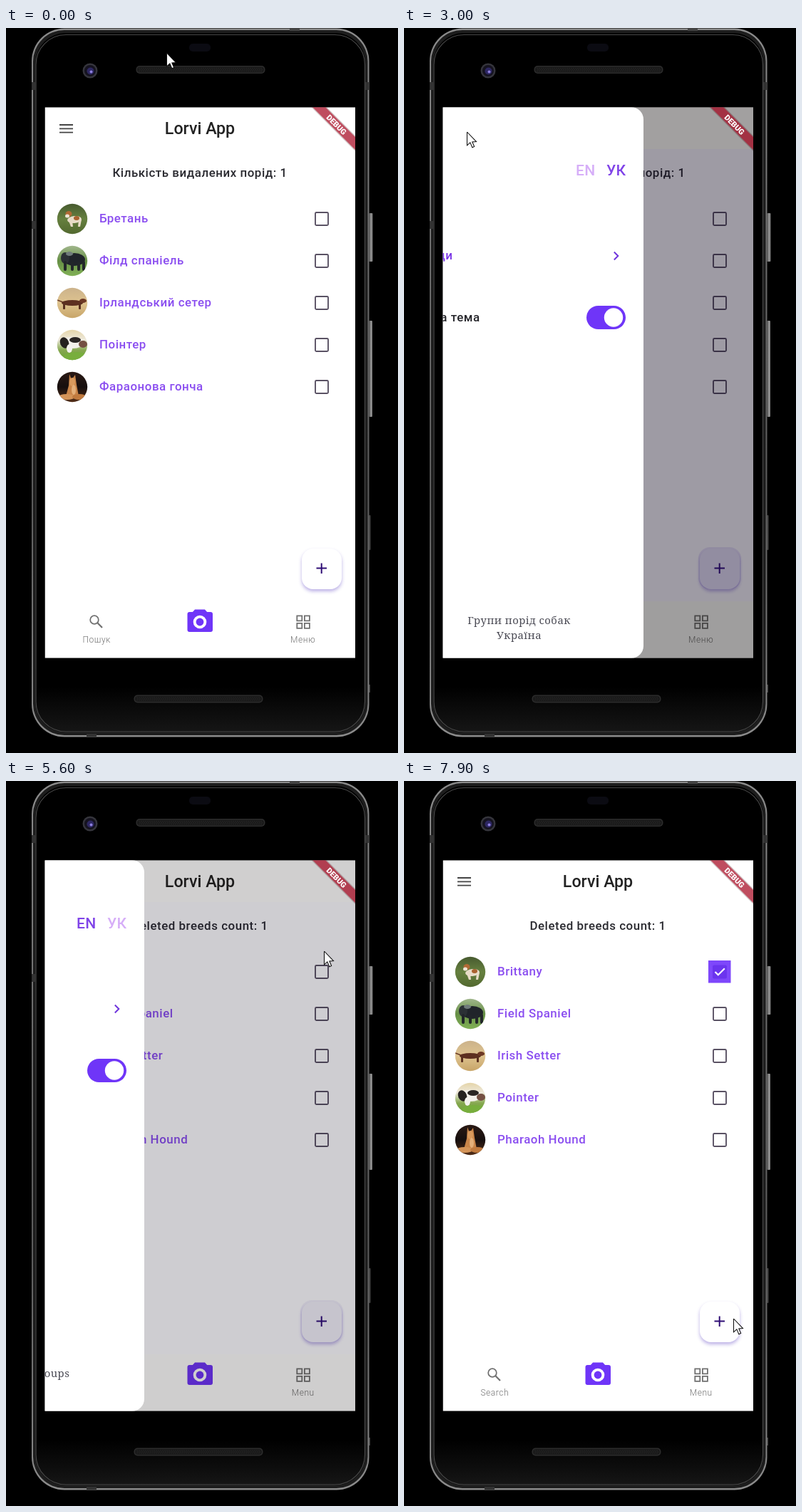
An HTML page with a canvas for the animation above (8000 ms loop, 550x1018 px).

```html
<!DOCTYPE html>
<html lang="uk">
<head>
<meta charset="utf-8">
<title>Dog breeds app</title>
<style>
html, body { margin: 0; width: 100%; height: 100%; overflow: hidden; background: #000; }
canvas { display: block; width: 550px; height: 1018px; }
</style>
</head>
<body>
<canvas id="stage" width="550" height="1018"></canvas>
<script>
const ctx = document.getElementById('stage').getContext('2d');
const LOOP = 8000, STEP = 100;
const SANS = 'Roboto, sans-serif', SERIF = '"Noto Serif", serif';
const PURPLE = '#6f35f8', LABEL = '#8a4df0';
const SCREEN = { x: 54.5, y: 111.3, w: 435.5, h: 773.5 };
const DRAWER_W = 348.5;

const TEXT = {
  uk: {
    count: 'Кількість видалених порід: 1',
    breeds: ['Бретань', 'Філд спаніель', 'Ірландський сетер', 'Поінтер', 'Фараонова гонча'],
    search: 'Пошук', menu: 'Меню', link: 'Породи', theme: 'Світла тема',
    footer: ['Групи порід собак', 'Україна']
  },
  en: {
    count: 'Deleted breeds count: 1',
    breeds: ['Brittany', 'Field Spaniel', 'Irish Setter', 'Pointer', 'Pharaoh Hound'],
    search: 'Search', menu: 'Menu', link: 'Breeds', theme: 'Light theme',
    footer: ['Dogs breed groups', 'Ukraine']
  }
};

// Keyframes: [time, x, y]
const POINTER = [
  [1300, 225, 35], [1800, 145, 146], [2200, 91, 151], [2400, 88, 146],
  [3250, 88, 146], [3500, 126, 151], [4200, 319, 196], [4450, 319, 196],
  [5050, 497, 227], [5200, 497, 227], [5500, 448, 238], [6100, 441, 243],
  [6400, 441, 262], [6900, 441, 262], [7850, 462, 755]
];
const OPEN_AT = 2864, CLOSE_AT = 5510, ENGLISH_AT = 4400, CHECK_AT = 6600;

// Smooth curve through the keyframes that keeps its speed at each one
function at(keys, t) {
  const last = keys.length - 1;
  const i = keys.findIndex(k => k[0] > t);
  if (i === 0) return keys[0].slice(1);
  if (i < 0) return keys[last].slice(1);
  const slope = (j, n) => (keys[j + 1][n] - keys[j][n]) / (keys[j + 1][0] - keys[j][0]);
  const tangent = (j, n) => {
    if (j === 0 || j === last) return 0;
    const p = slope(j - 1, n), q = slope(j, n);
    return p * q > 0 ? 2 * p * q / (p + q) : 0;
  };
  const a = keys[i - 1], b = keys[i], span = b[0] - a[0], u = (t - a[0]) / span;
  return [1, 2].map(n =>
    a[n] + (b[n] - a[n]) * u * u * (3 - 2 * u) +
    span * u * (1 - u) * ((1 - u) * tangent(i - 1, n) - u * tangent(i, n)));
}

// Critically damped spring from 0 to 1
function spring(ms) {
  const x = Math.max(0, ms) * .0224;
  return 1 - (1 + x) * Math.exp(-x);
}

function box(x, y, w, h, fill, r = 0) {
  ctx.fillStyle = fill;
  ctx.beginPath();
  ctx.roundRect(x, y, w, h, r);
  ctx.fill();
}

function frame(x, y, w, h, color, width, r = 0) {
  ctx.strokeStyle = color;
  ctx.lineWidth = width;
  ctx.beginPath();
  ctx.roundRect(x, y, w, h, r);
  ctx.stroke();
}

function oval(x, y, rx, ry, fill, turn = 0) {
  ctx.fillStyle = fill;
  ctx.beginPath();
  ctx.ellipse(x, y, rx, ry, turn, 0, Math.PI * 2);
  ctx.fill();
}

function line(color, width, ...pts) {
  ctx.strokeStyle = color;
  ctx.lineWidth = width;
  ctx.beginPath();
  pts.forEach(([x, y]) => ctx.lineTo(x, y));
  ctx.stroke();
}

function poly(fill, ...pts) {
  ctx.fillStyle = fill;
  ctx.beginPath();
  pts.forEach(([x, y]) => ctx.lineTo(x, y));
  ctx.closePath();
  ctx.fill();
}

function text(str, x, y, size, color, { weight = 500, gap = .53, align = 'left', family = SANS } = {}) {
  ctx.font = `${weight} ${size}px ${family}`;
  ctx.letterSpacing = gap + 'px';
  ctx.textAlign = align;
  ctx.fillStyle = color;
  ctx.fillText(str, x, y);
}

function fade(x0, y0, x1, y1, ...colors) {
  const g = ctx.createLinearGradient(x0, y0, x1, y1);
  colors.forEach((c, i) => g.addColorStop(i / (colors.length - 1), c));
  return g;
}

function speaker(x, y) {
  box(x, y, 181, 11, '#2c2c2c', 5);
  box(x + 1.5, y + 1.5, 178, 8, '#191919', 4);
  ctx.setLineDash([1, 2]);
  for (let i = 0; i < 3; i++) line('#333', 1, [x + 4 + i % 2, y + 3.5 + i * 2], [x + 177, y + 3.5 + i * 2]);
  ctx.setLineDash([]);
}

function phone() {
  const metal = fade(509, 0, 515, 0, '#333', '#9a9a9a', '#666');
  box(0, 0, 550, 1018, '#000');
  box(509, 260, 5.5, 68, metal, 1);
  box(509, 411, 5, 135, metal, 1);
  box(509, 684, 2.5, 49, '#444', 1);
  box(509, 922, 2, 11, '#444');
  box(36, .5, 473.5, 995, fade(0, 0, 0, 996, '#8c8c8c', '#6c6c6c', '#5c5c5c', '#8c8c8c'), 46);
  box(38, 3, 469.5, 990, '#1d1d1d', 44);
  box(36, 76, 5, 11, '#333');
  box(504, 76, 5, 11, '#333');
  box(36, 271, 5, 11, '#333');
  box(398, 0, 14, 4, '#444');
  box(113, 991, 14, 4, '#333');
  box(41.5, 7, 462.5, 982, '#000', 42);
  box(41.5, 900, 462.5, 89, fade(0, 925, 0, 989, '#000', '#161616'), [0, 0, 42, 42]);
  frame(42, 9.5, 461.5, 978.5, '#484848', 1.2, 42);
  box(257, 22, 30, 11, '#0b0b12', 5);
  speaker(182.5, 53);
  speaker(179.5, 936.5);
  oval(118, 60, 10.5, 10.5, '#35353c');
  oval(118, 60, 8, 8, '#15131f');
  oval(118.5, 60.5, 5, 5, '#2d2762');
  oval(119.5, 61.5, 2, 2, '#8d7fe0');
}

// Simplified pictures, drawn around the origin
const PHOTOS = [
  () => {
    box(-22, -22, 44, 44, fade(0, -22, 0, 22, '#46592f', '#66803f', '#52682f'));
    oval(3, 1, 10, 5, '#e8dcc8', -.1);
    oval(6, -1, 4, 3, '#a9622f');
    poly('#e8dcc8', [-6, 0], [-2, 11], [1, 11], [0, 3]);
    poly('#e8dcc8', [9, 1], [8, 11], [11, 11], [13, 1]);
    oval(-5, -7, 4.5, 4, '#b06a35');
    oval(-7, -4, 3, 2.5, '#efe5d5');
  },
  () => {
    box(-22, -22, 44, 44, fade(0, -22, 0, 22, '#a3b88f', '#668f45', '#82b257'));
    oval(3, -2, 15, 9, '#20242a');
    oval(-10, -4, 6, 8, '#2b3035');
    [-12, -2, 7, 14].forEach(x => box(x, 0, 4, 14, '#22262a', 2));
    oval(-4, -10, 5, 3, '#707b7b');
  },
  () => {
    box(-22, -22, 44, 44, fade(0, -22, 0, 22, '#cbb28b', '#dec38f', '#c7a467'));
    oval(0, 0, 15, 4, '#5d2f20');
    oval(15, -3, 5, 3, '#6d3824');
    box(-13, 0, 3, 9, '#5a3020', 1);
    box(9, 0, 3, 9, '#5a3020', 1);
    line('#6b3c27', 1.5, [-13, -1], [-21, -4]);
  },
  () => {
    box(-22, -22, 44, 44, fade(0, -22, 0, 22, '#e4d3a6', '#eee9dc', '#86a850', '#69a033'));
    oval(0, -3, 16, 8, '#f3f0ea');
    oval(-11, -3, 6, 8, '#25211f', -.4);
    oval(4, -7, 8, 4, '#2a2523');
    oval(15, -1, 6, 5, '#755043');
    oval(-4, 5, 4, 6, '#f4f2ee');
    oval(5, 17, 17, 7, '#78ae3d');
  },
  () => {
    box(-22, -22, 44, 44, fade(0, -22, 0, 22, '#2b1a14', '#160f0e', '#563018'));
    poly('#c98549', [-4, -18], [-1, -10], [4, -17], [6, -3], [9, 13], [-9, 13], [-5, -2]);
    oval(0, -7, 4, 6, '#d99a5d');
    oval(-8, 14, 12, 4, '#d49458');
    oval(10, 14, 10, 4, '#c07a3e');
    oval(2, 4, 3, 7, '#e4b07a');
  }
];

function row(i, name, checked) {
  const y = Math.round(268 + i * 59.1);
  ctx.save();
  ctx.translate(93, y);
  ctx.beginPath();
  ctx.arc(0, 0, 21.2, 0, Math.PI * 2);
  ctx.clip();
  PHOTOS[i]();
  ctx.restore();
  text(name, 131, y + 5, 16.9, LABEL);
  if (checked) {
    box(427, y - 16, 31.5, 31.5, '#7e47fb');
    box(433, y - 9.5, 20, 19, '#6b34ee', 2);
    line('#fff', 2.2, [436.5, y], [440.8, y + 4.3], [449.8, y - 4.7]);
  } else {
    frame(434, y - 9, 18, 18, '#5a5264', 1.9, 1.5);
  }
}

function fab() {
  ctx.save();
  ctx.shadowColor = 'rgba(80, 50, 190, .38)';
  ctx.shadowBlur = 5;
  ctx.shadowOffsetY = 3;
  box(415, 731, 56, 57, '#fff', 16);
  ctx.restore();
  line('#2e0d75', 2, [435.5, 758.5], [450, 758.5]);
  line('#2e0d75', 2, [442.7, 751.5], [442.7, 766]);
}

function nav(tx) {
  const gray = '#707070';
  ctx.strokeStyle = gray;
  ctx.lineWidth = 1.8;
  ctx.beginPath();
  ctx.arc(124, 831, 5.8, 0, Math.PI * 2);
  ctx.stroke();
  line(gray, 2.2, [128.3, 835.3], [135, 842]);
  text(tx.search, 127.2, 863, 12, gray, { weight: 300, align: 'center' });

  poly(PURPLE, [261, 821], [265, 816.5], [279, 816.5], [283, 821]);
  box(254.5, 820, 35.5, 28, PURPLE, 3);
  oval(272, 834, 9.3, 9.3, '#fff');
  oval(272, 834, 5.4, 5.4, PURPLE);

  for (const x of [408.3, 418.9]) for (const y of [825.3, 835.9]) frame(x, y, 7, 7, gray, 1.8);
  text(tx.menu, 416.7, 863, 12, gray, { weight: 300, align: 'center' });
}

function page(tx, checked) {
  box(SCREEN.x, SCREEN.y, SCREEN.w, SCREEN.h, '#fff');
  for (const y of [136, 141.3, 146.6]) line('#444', 1.8, [75, y], [94, y]);
  text('Lorvi App', 272, 148.6, 23.2, '#222', { gap: 0, align: 'center' });
  text(tx.count, 272, 209.3, 16.9, '#2a2a30', { align: 'center' });
  tx.breeds.forEach((name, i) => row(i, name, checked && i === 0));
  fab();
  nav(tx);
}

function drawer(p, tx, english) {
  const { x, y, w, h } = SCREEN;
  box(x, y, w, 170 - y, `rgba(8, 5, 4, ${.465 * p})`);
  box(x, 170, w, 635, `rgba(8, 0, 24, ${.485 * p})`);
  box(x, 805, w, y + h - 805, `rgba(6, 4, 3, ${.475 * p})`);
  box(413, 729, 60, 59, `rgba(50, 25, 130, ${.13 * p})`, 16);

  ctx.save();
  ctx.translate(Math.round((p - 1) * DRAWER_W), 0);
  box(x, y, DRAWER_W, h, '#fff', [0, 17, 17, 0]);
  const on = '#8044e8', off = '#d6aef8';
  text('EN', 308, 207, 21.1, english ? on : off, { gap: .3 });
  text('УК', 351, 207, 21.1, english ? off : on, { gap: .3 });
  text(tx.link, 72, 325, 16.9, '#7a35e6');
  line('#7036dc', 2, [361.8, 314.5], [367.3, 320], [361.8, 325.5]);
  text(tx.theme, 73, 412, 16.9, '#26262b');
  box(323, 390, 55, 33, PURPLE, 16.5);
  oval(361, 406.5, 13.2, 13.2, '#fff');
  tx.footer.forEach((s, i) =>
    text(s, 228.5, 837 + i * 21, 14.8, '#4a4a54', { weight: 400, gap: .5, align: 'center', family: SERIF }));
  ctx.restore();
}

function banner() {
  ctx.save();
  ctx.translate(463.8, 135.8);
  ctx.rotate(Math.PI / 4);
  box(-60, -6.4, 120, 12.8, 'rgba(164, 2, 28, .7)');
  for (const y of [-7.6, 6.4]) box(-60, y, 120, 1.2, 'rgba(60, 0, 10, .25)');
  text('DEBUG', 0, 3.9, 10.8, '#fff', { weight: 900, gap: 0, align: 'center' });
  ctx.restore();
}

function cursor(x, y) {
  const pts = [[0, 0], [0, 16], [3.7, 12.6], [6.2, 18.4], [8.6, 17.3], [6.2, 11.8], [11, 11.5]];
  ctx.save();
  ctx.translate(Math.round(x) + .5, Math.round(y));
  ctx.scale(1.18, 1.18);
  poly('#fff', ...pts);
  line('#111', .9, ...pts, pts[0]);
  ctx.restore();
}

function draw(now) {
  const t = Math.floor(now % LOOP / STEP) * STEP;
  const english = t >= ENGLISH_AT;
  const tx = english ? TEXT.en : TEXT.uk;
  const open = spring(t - OPEN_AT) - spring(t - CLOSE_AT);
  phone();
  ctx.save();
  ctx.beginPath();
  ctx.rect(SCREEN.x, SCREEN.y, SCREEN.w, SCREEN.h);
  ctx.clip();
  page(tx, t >= CHECK_AT);
  if (open > .002) drawer(open, tx, english);
  banner();
  ctx.restore();
  cursor(...at(POINTER, t));
}

const start = performance.now();
function tick() {
  draw(performance.now() - start);
  requestAnimationFrame(tick);
}
tick();
</script>
</body>
</html>
```
